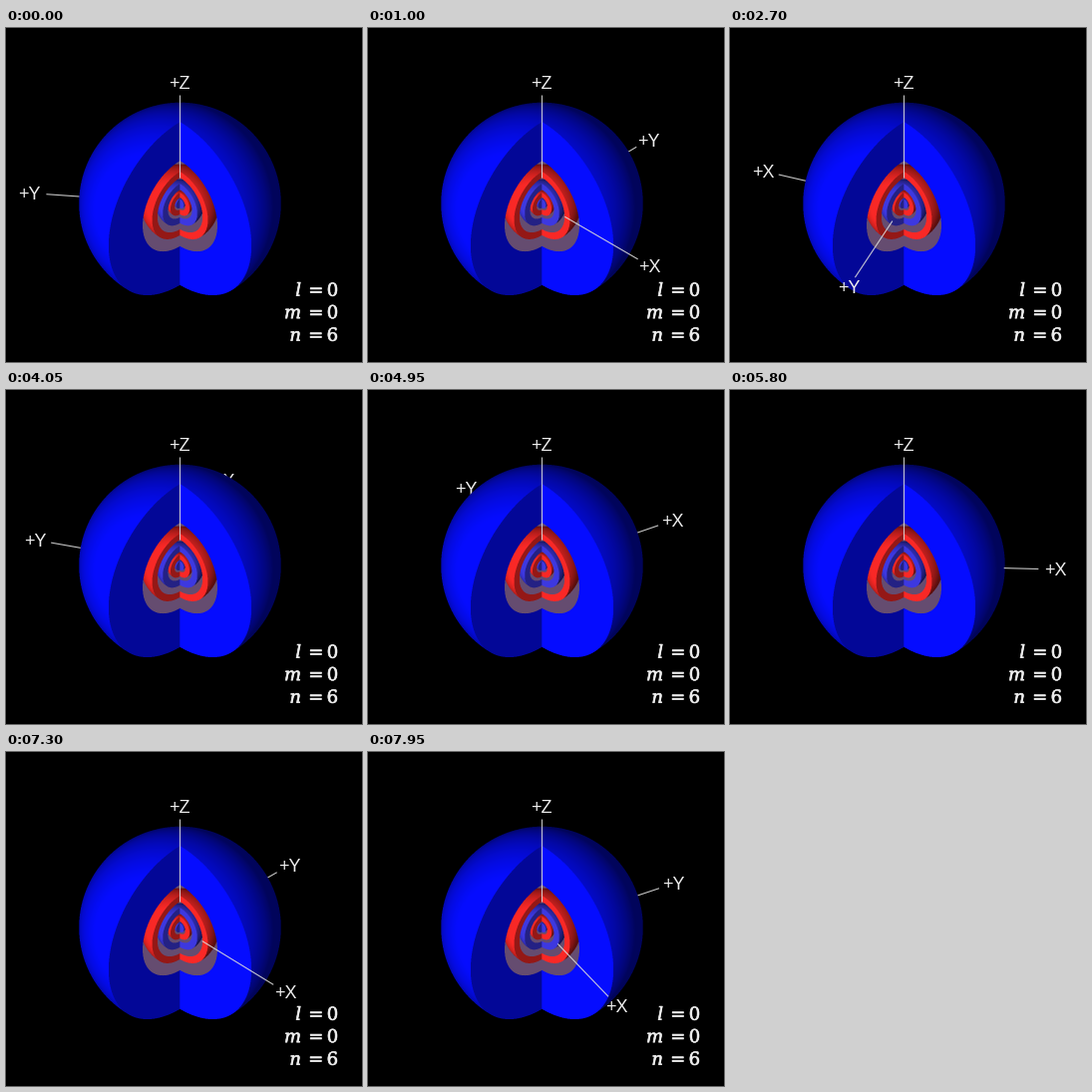
A matplotlib script for the animation above (8000 ms loop, 357 by 335 pixels).

```python
import numpy as np
import matplotlib.pyplot as plt
from matplotlib import patheffects
from matplotlib.animation import FuncAnimation

W, H, DPI = 357, 335, 100
PX = 72 / DPI                      # points per pixel
CX, CY = 174.5, 176.0              # projected origin
R = 101.3                          # outer radius
SIN_E = 0.59                       # camera elevation
COS_E = np.sqrt(1 - SIN_E**2)
TAN_E = SIN_E / COS_E
AXIS_IN, AXIS_OUT, LABEL_R = 32, 135, 152
FRAMES, STEP = 160, 50

BLUE = np.array([0.02, 0.05, 1.0])
SOFT_BLUE = np.array([0.24, 0.22, 0.88])
RED = np.array([0.98, 0.16, 0.15])
GREY = np.array([0.40, 0.30, 0.44])

# hollow gaps between shells: inner radius, outer radius, enclosed colour
GAPS = [(39.5, 53, RED), (24.5, 32, SOFT_BLUE),
        (13.5, 17, RED), (5.5, 7.5, SOFT_BLUE)]

plt.rcParams["font.family"] = "Liberation Sans"
plt.rcParams["mathtext.fontset"] = "dejavuserif"


def shade(nx, ny, nz):
    """Brightness of a surface with the given view-space normal."""
    light = -0.38 * nx - 0.10 * ny + 0.92 * nz
    return np.clip(0.36 + 0.78 * np.clip(light, 0, None), 0, 1)


def tint(color, lum):
    return color * lum[..., None]


def render_orbital(ss=3):
    """Nested shells with a quarter wedge removed, as an RGBA image."""
    x = (np.arange(W * ss) + 0.5) / ss - CX
    y = CY - (np.arange(H * ss) + 0.5) / ss
    u, v = np.meshgrid(x, y)
    p2 = u**2 + v**2

    def ball_shade(r):
        depth = np.sqrt(np.clip(r**2 - p2, 0, None))
        return shade(u / r, v / r, depth / r)

    # cut faces
    z = (v + np.abs(u) * SIN_E) / COS_E
    rho = np.sqrt(2 * u**2 + z**2)
    cap = rho <= R
    nx, ny, nz = 0.707, -0.707 * SIN_E, 0.707 * COS_E
    face = np.where(u < 0, shade(nx, ny, nz), shade(-nx, ny, nz))

    # outer surface
    w = np.sqrt(np.clip(R**2 - p2, 0, None))
    in_wedge = w * COS_E - v * SIN_E > np.abs(u)
    ball = (p2 <= R**2) & ~in_wedge & ~cap
    rgb = tint(BLUE, np.where(cap, face, ball_shade(R)))

    # through each gap one sees the next shell or the far wall
    face_depth = np.abs(u) * COS_E + z * SIN_E
    for inner, outer, color in GAPS:
        hit = (p2 < inner**2) & (face_depth > 0)
        seen = np.where(hit[..., None], tint(color, ball_shade(inner)), GREY)
        rgb = np.where((rho < outer)[..., None], seen, rgb)
        rgb = np.where((rho < inner)[..., None], tint(color, face), rgb)

    alpha = (cap | ball).astype(float)
    rgba = np.dstack([rgb * alpha[..., None], alpha])
    rgba = rgba.reshape(H, ss, W, ss, 4).mean(axis=(1, 3))
    rgba[..., :3] /= np.maximum(rgba[..., 3:], 1e-6)
    return np.clip(rgba, 0, 1)


def project(r, phi):
    """Screen position of a point in the equatorial plane."""
    return CX + r * np.sin(phi), CY + r * np.cos(phi) * SIN_E


def visible_radii(phi):
    """Radii along an axis that the sphere does not hide."""
    s, c = abs(np.sin(phi)), np.cos(phi)
    if c >= s - 0.05:              # in the wedge or lying on its face
        return np.array([AXIS_IN, AXIS_OUT])
    if c <= 0:
        return np.array([0, AXIS_OUT])
    # glimpse through the widest gap
    inner, outer, _ = GAPS[0]
    k = np.sqrt(2 * s**2 + (TAN_E * (s - c)) ** 2)
    return np.array([inner, max(inner, outer / k), np.nan, R - 1, AXIS_OUT])


fig = plt.figure(figsize=(W / DPI, H / DPI), dpi=DPI, facecolor="black")
ax = fig.add_axes([0, 0, 1, 1])
ax.axis("off")
ax.imshow(render_orbital(), extent=(0, W, H, 0), interpolation="nearest",
          aspect="auto", zorder=2)
ax.set_xlim(0, W)
ax.set_ylim(H, 0)


def axis_line():
    return ax.plot([], [], color="0.86", lw=1.1 * PX, alpha=0.9,
                   solid_capstyle="butt")[0]


def axis_label(name):
    return ax.text(0, 0, "+" + name, color="0.93", fontsize=18 * PX,
                   ha="center", va="baseline")


z_line, z_label = axis_line(), axis_label("Z")
z_line.set_data([CX - 0.2] * 2, [CY - AXIS_IN * COS_E, CY - AXIS_OUT * COS_E])
z_line.set_zorder(3)
z_label.set_position((CX - 0.3, CY - LABEL_R * COS_E + 7.5))
z_label.set_zorder(3)

bolder = [patheffects.withStroke(linewidth=0.6 * PX, foreground="0.9")]
for row, (name, value) in enumerate((("l", 0), ("m", 0), ("n", 6))):
    ax.text(334, 268.7 + 22.6 * row, rf"${name}\:={value}$", color="0.93",
            fontsize=18 * PX, ha="right", va="baseline", zorder=4,
            path_effects=bolder)

arms = [(axis_line(), axis_label("X"), 0), (axis_line(), axis_label("Y"), 90)]


def update(i):
    # spin that slows down exponentially
    turn = 173.3 - 587 * (1 - np.exp(-i * STEP / 4070))
    for line, label, offset in arms:
        phi = np.radians(turn + offset)
        line.set_data(*project(visible_radii(phi), phi))
        x, y = project(LABEL_R, phi)
        label.set_position((x, y + 6.5))
        order = 3 if np.cos(phi) > 0 else 1
        line.set_zorder(order)
        label.set_zorder(order)
    return [a for arm in arms for a in arm[:2]]


anim = FuncAnimation(fig, update, frames=FRAMES, interval=STEP,
                     repeat=True, repeat_delay=0, blit=False)
plt.show()
```
